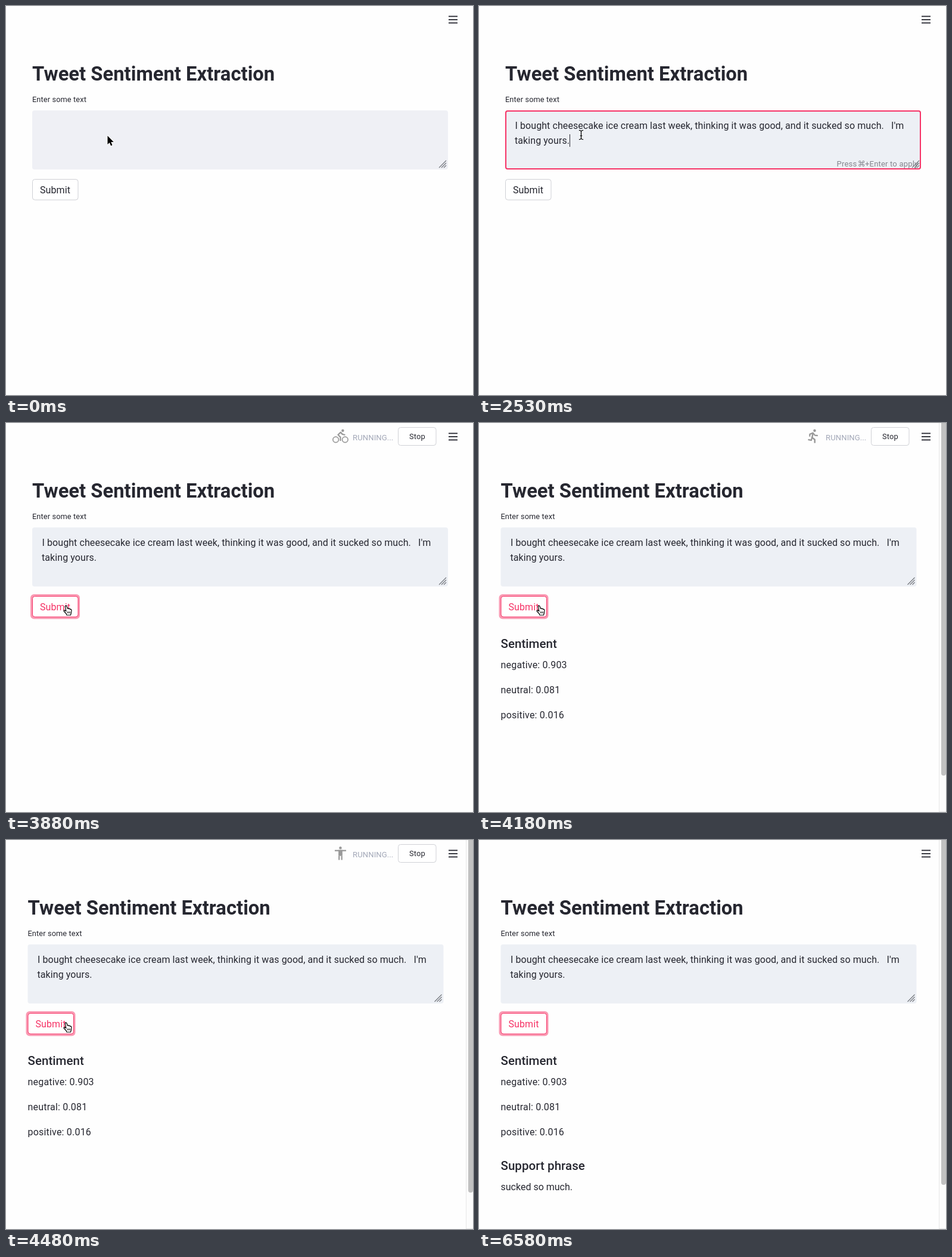
An HTML page with a canvas for the animation above (6.73 s loop, 784 by 652 pixels).

```html
<!DOCTYPE html>
<html lang="en">
<head>
<meta charset="utf-8">
<title>Sentiment demo</title>
<style>
  html, body { margin: 0; width: 100%; height: 100%; overflow: hidden; background: #fefefe; }
  canvas { display: block; width: 784px; height: 652px; }
</style>
</head>
<body>
<canvas id="stage" width="784" height="652"></canvas>
<script>
const ctx = document.getElementById('stage').getContext('2d');
const LOOP = 6730;
const INK = '#262730', RED = '#f63366', PAGE = '#fefefe';
const SANS = 'Roboto, sans-serif';

// Moments at which the interface switches state.
const AT = {
  settle: 1500, focus: 1940, caretOff: 2380, paste: 2530, caretOff2: 2980,
  hover: 3430, click: 3580, running: 3730, scores: 4180, phrase: 4780, idle: 4930
};

// [start, shape, x, y]
const POINTER = [
  [0, 'arrow', 170.5, 217.5], [150, 'arrow', 170.5, 216], [300, 'arrow', 170.5, 214.5],
  [1500, 'beam', 172.5, 216], [1640, 'beam', 171.5, 216],
  [2980, 'beam', 166.5, 224], [3130, 'beam', 148.5, 248], [3280, 'arrow', 121, 281],
  [3430, 'hand', 99, 306], [3580, 'hand', 96, 305],
  [5980, 'arrow', 126, 322], [6130, 'arrow', 270, 398], [6280, 'arrow', 500, 520],
  [6430, 'arrow', 702, 633], [6580, 'none', 0, 0]
];

const ICONS = [
  [3730, 'run'], [3880, 'bike'], [4030, 'person'], [4180, 'run'], [4330, 'swim'], [4480, 'person']
];

const current = (list, t) => list.filter(item => item[0] <= t).pop();

function text(str, x, y, size = 16, { color = INK, weight = 400, spacing = 0.08, family = SANS } = {}) {
  ctx.font = `${weight} ${size}px ${family}`;
  ctx.letterSpacing = spacing + 'px';
  ctx.fillStyle = color;
  ctx.fillText(str, x, y);
}

function box(x, y, w, h, r, fill, stroke, width = 1) {
  ctx.beginPath();
  ctx.roundRect(x, y, w, h, r);
  if (fill) { ctx.fillStyle = fill; ctx.fill(); }
  if (stroke) { ctx.strokeStyle = stroke; ctx.lineWidth = width; ctx.stroke(); }
}

function trace(points) {
  ctx.beginPath();
  points.forEach(([x, y]) => ctx.lineTo(x, y));
}

function line(points, width) {
  trace(points);
  ctx.lineWidth = width;
  ctx.stroke();
}

function dot(x, y, r) {
  ctx.beginPath();
  ctx.arc(x, y, r, 0, Math.PI * 2);
  ctx.fill();
}

function ring(x, y, r, width) {
  ctx.beginPath();
  ctx.arc(x, y, r, 0, Math.PI * 2);
  ctx.lineWidth = width;
  ctx.stroke();
}

const icons = {
  bike() {
    dot(15.5, 3.5, 2);
    ring(5, 17, 4.25, 1.5);
    ring(19, 17, 4.25, 1.5);
    line([[12, 19], [12, 13.4], [8.4, 9.8], [12.3, 6.1], [15, 9], [19.1, 10]], 2);
  },
  run() {
    dot(13.8, 3.6, 2);
    line([[6.5, 12.5], [6.5, 9], [11.3, 7], [14.2, 10.6], [18.6, 11]], 2);
    line([[11.4, 7.2], [10, 14], [14, 17], [14, 22]], 2.2);
    line([[10, 13], [8.8, 18], [4, 17]], 2);
  },
  swim() {
    dot(16.8, 5.4, 2.5);
    line([[4.5, 4.4], [7.6, 4.4], [14.5, 12]], 2.5);
    line([[10.5, 8.6], [6.5, 12]], 2.8);
    for (const y of [15.4, 19.6]) {
      const wave = [];
      for (let x = 2; x <= 22; x += 0.5) wave.push([x, y - 0.9 * Math.cos((x - 2) * Math.PI * 0.3)]);
      line(wave, 2);
    }
  },
  person() {
    dot(12, 4, 2);
    ctx.fillRect(3.5, 7, 17, 2);
    ctx.fillRect(9, 7, 6, 9);
    ctx.fillRect(9, 16, 2, 6);
    ctx.fillRect(13, 16, 2, 6);
  }
};

const pointers = {
  none() {},
  arrow() {
    trace([[0, 0], [0, 14.5], [3.3, 11.5], [5.6, 16.8], [8, 15.8], [5.8, 10.6], [10.3, 10.5]]);
    ctx.closePath();
    ctx.lineWidth = 2;
    ctx.strokeStyle = '#fff';
    ctx.stroke();
    ctx.fillStyle = '#000';
    ctx.fill();
  },
  beam() {
    ctx.strokeStyle = '#000';
    line([[0, -6.5], [0, 6.5]], 1.3);
    line([[-1.8, 1.5], [1.8, 1.5]], 1);
    for (const s of [-1, 1]) line([[-3.6, 7.6 * s], [-1.5, 7.4 * s], [0, 6.2 * s], [1.5, 7.4 * s], [3.6, 7.6 * s]], 1.2);
  },
  hand() {
    trace([[3.2, 2.2], [4.6, 1], [6, 2], [7.2, 6], [8.6, 5.5], [9.6, 6.6], [11, 6.1], [12, 7.3],
      [13.2, 7.2], [14, 9], [13.6, 13], [12.4, 17], [6, 17], [5, 14.5], [1.2, 10.5], [1.2, 9.2],
      [2.6, 8.8], [4.9, 10.6]]);
    ctx.closePath();
    ctx.fillStyle = '#fff';
    ctx.fill();
    ctx.strokeStyle = '#000';
    ctx.lineWidth = 1.2;
    ctx.stroke();
    for (const x of [7.4, 9.4, 11.4]) line([[x, 11], [x, 14]], 0.9);
  }
};

function drawAt(shape, x, y, scale = 1) {
  ctx.save();
  ctx.translate(x, y);
  ctx.scale(scale, scale);
  ctx.lineJoin = 'round';
  shape();
  ctx.restore();
}

function drawTextArea(t) {
  const focused = t >= AT.focus && t < AT.click;
  const pasted = t >= AT.paste;
  box(44, 175, 698, 99, 4, t < AT.settle ? '#eff0f5' : '#edf0f5');
  if (focused) box(45, 176, 696, 97, 3, null, RED, 2);

  if (pasted) {
    text("I bought cheesecake ice cream last week, thinking it was good, and it sucked so much.\u00a0\u00a0 I'm", 60.5, 206);
    text('taking yours.', 60, 231);
  }
  ctx.fillStyle = INK;
  if (t >= AT.focus && t < AT.caretOff) ctx.fillRect(60, 189, 1, 21);
  if (pasted && t < AT.caretOff2) ctx.fillRect(152, 215, 1, 21);
  if (pasted && focused) {
    const hint = { color: '#84858d', spacing: 0.15 };
    text('Press', 600.5, 269, 13.1, hint);
    text('⌘', 635.5, 269, 13, { ...hint, family: '"DejaVu Sans", sans-serif' });
    text('+Enter to apply', 648, 269, 13.1, hint);
  }
  ctx.strokeStyle = '#71747a';
  for (const d of [0, 4, 8]) line([[727 + d, 271], [739, 259 + d]], 1.1);
}

function drawSubmit(t) {
  const hot = t >= AT.hover;
  if (t >= AT.click) box(41, 287, 83, 41.5, 6, '#fa9ab3');
  box(44.5, 290.5, 76.5, 34.5, 4, '#fff', hot ? RED : '#cfd0d5');
  text('Submit', 57, 313.5, 16, { color: hot ? RED : INK });
}

function drawResults(t) {
  const heading = { weight: 550, spacing: 0.05 };
  if (t >= AT.scores) {
    text('Sentiment', 44, 377, 20.5, heading);
    ['negative: 0.903', 'neutral: 0.081', 'positive: 0.016'].forEach((row, i) =>
      text(row, 44, 411 + i * 41.8, 16, { spacing: 0.2 }));
  }
  if (t >= AT.phrase) {
    text('Support phrase', 44, 552.5, 20.5, heading);
    text('sucked so much.', 44, 587, 16, { spacing: 0 });
  }
}

function drawStatus(t) {
  if (t < AT.running || t >= AT.idle) return;
  ctx.save();
  ctx.globalAlpha = t < 3880 || t >= AT.phrase ? 0.55 : 1;
  ctx.fillStyle = ctx.strokeStyle = '#999';
  drawAt(icons[current(ICONS, t)[1]], 548, 8.8, 1.12);
  text('RUNNING...', 582, 29, 13.1, { color: '#a3a8b8', spacing: 0.1 });
  box(658.5, 7.5, 63.5, 30, 4, '#fff', '#d0d1d6');
  text('Stop', 677, 27, 12.8, { spacing: 0.15 });
  ctx.restore();
}

function drawScrollbar(t) {
  if (t < AT.scores) return;
  ctx.fillStyle = '#fcfcfc';
  ctx.fillRect(772, 0, 12, 652);
  ctx.fillStyle = '#e7e7e7';
  ctx.fillRect(772, 0, 1, 652);
  ctx.fillRect(772, 651, 12, 1);
  box(776, -8, 8, t < AT.phrase ? 599 : 586, 4, '#c1c1c1');
}

function draw(t) {
  ctx.fillStyle = PAGE;
  ctx.fillRect(0, 0, 784, 652);

  ctx.save();
  if (t >= AT.scores) ctx.translate(-7.5, 0);
  text('Tweet Sentiment Extraction', 44, 125, 32.8, { weight: 700, spacing: 0 });
  text('Enter some text', 44, 161, 12.8, { spacing: 0.1 });
  drawTextArea(t);
  drawSubmit(t);
  drawResults(t);
  ctx.restore();

  drawStatus(t);
  ctx.fillStyle = INK;
  for (const y of [16.5, 22, 27.5]) ctx.fillRect(743, y, 15, 1.8);
  drawScrollbar(t);

  const [, shape, x, y] = current(POINTER, t);
  drawAt(pointers[shape], x, y);
}

const start = performance.now();
function tick() {
  draw((performance.now() - start) % LOOP);
  requestAnimationFrame(tick);
}
tick();
</script>
</body>
</html>
```
